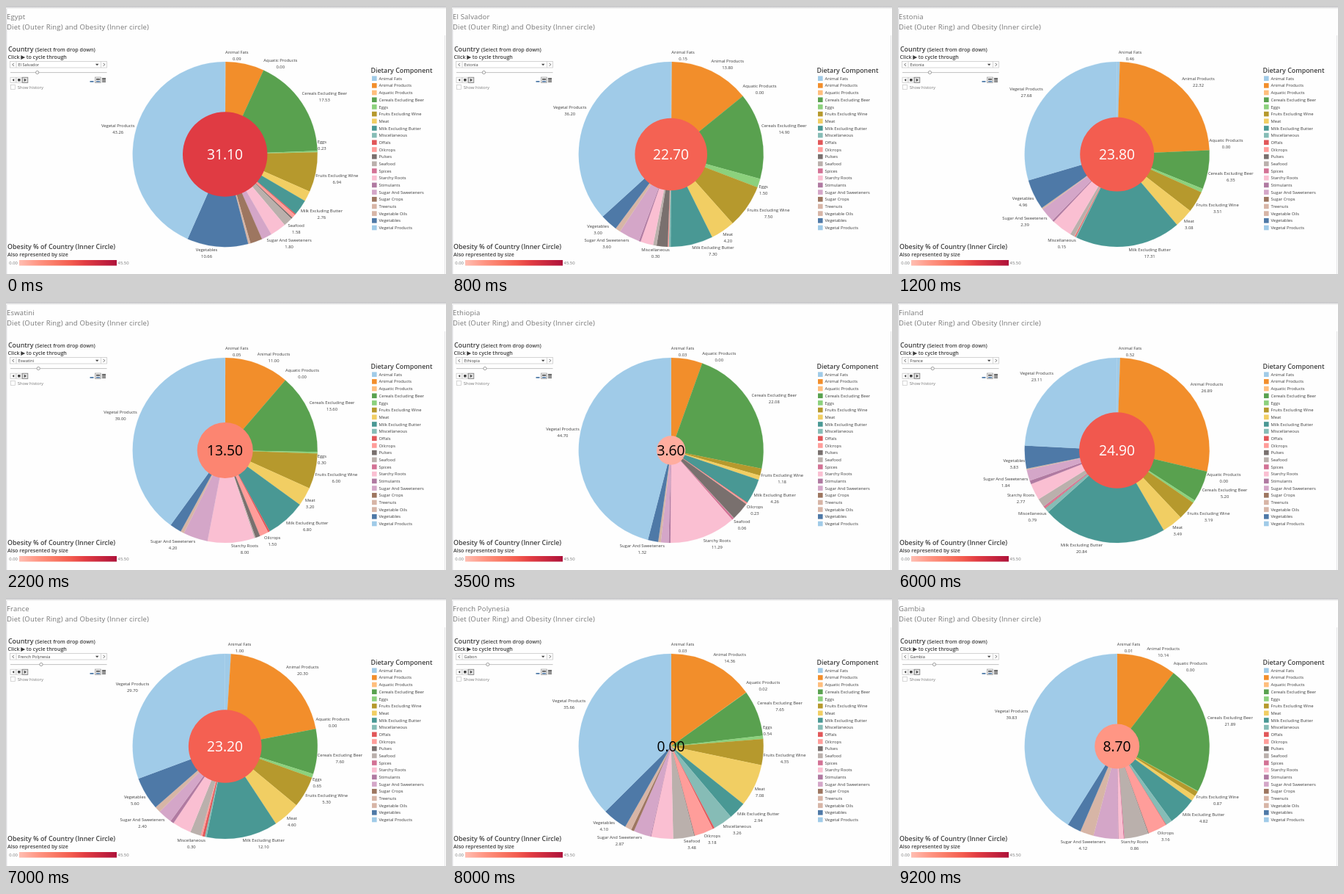
Recreate the animation shown at these times as an HTML page. Size 600 px wide and 365 px high, loop 9500 ms.

```html
<!DOCTYPE html>
<html lang="en">
<head>
<meta charset="utf-8">
<title>Diet and obesity by country</title>
<style>
  html, body { margin: 0; width: 100%; height: 100%; overflow: hidden; background: #fefefe; }
  svg { display: block; width: 600px; height: 365px; font: 5.85px "Open Sans", "Noto Sans", sans-serif; fill: #3c3c3c; }
  .title { font-size: 9.5px; letter-spacing: .18px; fill: #777; }
  .head { font-size: 8.9px; font-weight: 600; }
  .small { font-size: 7.1px; font-weight: 600; }
  .soft { fill: #777; }
  .mid { text-anchor: middle; }
  .big { font-size: 19.3px; text-anchor: middle; }
  .box { fill: #fff; stroke: #c4c4c4; stroke-width: .7; }
  .ink { fill: #444; }
  .line { fill: none; stroke: #555; stroke-width: .9; }
</style>
</head>
<body>
<svg id="stage" viewBox="0 0 600 365" xmlns="http://www.w3.org/2000/svg">
  <defs>
    <linearGradient id="ramp"></linearGradient>
    <linearGradient id="top" x2="0" y2="1">
      <stop stop-color="#bdbdc0"/><stop offset="1" stop-color="#fefefe"/>
    </linearGradient>
    <linearGradient id="side">
      <stop stop-color="#d2d2d5"/><stop offset="1" stop-color="#fefefe"/>
    </linearGradient>
  </defs>
  <rect width="600" height="365" fill="#fefefe"/>
  <rect width="2" height="365" fill="url(#side)"/>
  <rect width="600" height="4" fill="url(#top)"/>
  <path d="M598.5 40V365" stroke="#e4e4e6"/>

  <text id="title" class="title" x="1" y="18.4"></text>
  <text class="title" x="1" y="32.4">Diet (Outer Ring) and Obesity (Inner circle)</text>

  <text class="head" x="3" y="62">Country <tspan class="small">(Select from drop down)</tspan></text>
  <text class="small" x="2.5" y="71.8">Click ▶ to cycle through</text>

  <rect class="box" x="5.5" y="75.5" width="132" height="8.5"/>
  <path class="box" d="M14 75.5v8.5M129.5 75.5v8.5"/>
  <path class="line" d="M10.8 77.8l-2 2 2 2M132.7 77.8l2 2-2 2"/>
  <path class="ink" d="M122 78.8h4.4l-2.2 2.4z"/>
  <text id="pick" x="16.5" y="81.9" font-size="5.6"></text>

  <path d="M6 90.6H137.5" stroke="#c2c2c2"/>
  <circle id="thumb" cy="90.5" r="2.1" fill="#fff" stroke="#888" stroke-width=".8"/>

  <rect class="box" x="6" y="97.2" width="7.6" height="7.2"/>
  <rect class="box" x="14" y="97.2" width="7.6" height="7.2"/>
  <rect x="22.2" y="97.2" width="7.6" height="7.2" fill="#e2e2e2" stroke="#777" stroke-width=".8"/>
  <path class="ink" d="M11.2 98.9v3.8l-2.7-1.9zM16.1 99.1h3.5v3.5h-3.5zM24.8 98.7v4.2l3-2.1z"/>
  <rect x="121.6" y="97" width="8" height="7.6" fill="#e6e6e6" stroke="#999" stroke-width=".7"/>
  <path fill="#4e79a7" d="M114.5 102h5v1.7h-5zM123 101.9h5.2v1.7H123z"/>
  <path class="ink" d="M123 99h5.2v1.5H123zM131 98h5v1.4h-5zM131 100.2h5v1.4h-5zM131 102.4h5v1.4h-5z"/>
  <rect class="box" x="6.3" y="107.3" width="6" height="6"/>
  <text class="soft" x="15.8" y="112.7">Show history</text>

  <text class="head" x="497.5" y="90.7">Dietary Component</text>
  <g id="legend"></g>

  <text class="head" x="2" y="330.8">Obesity % of Country (Inner Circle)</text>
  <text class="small" x="2" y="341">Also represented by size</text>
  <text class="soft" x="4.3" y="352.3">0.00</text>
  <rect x="18" y="346" width="133" height="7.6" fill="url(#ramp)"/>
  <text class="soft" x="152.6" y="352.3">45.50</text>
  <g id="pies"></g>
</svg>
<script>
const LOOP = 9500, CX = 298.7, CY = 202, R = 126, MAX = 45.5;

const parts = [
  ["Animal Fats", "#a0cbe8"], ["Animal Products", "#f28e2b"], ["Aquatic Products", "#ffbe7d"],
  ["Cereals Excluding Beer", "#59a14f"], ["Eggs", "#8cd17d"], ["Fruits Excluding Wine", "#b6992d"],
  ["Meat", "#f1ce63"], ["Milk Excluding Butter", "#499894"], ["Miscellaneous", "#86bcb6"],
  ["Offals", "#e15759"], ["Oilcrops", "#ff9d9a"], ["Pulses", "#79706e"], ["Seafood", "#bab0ac"],
  ["Spices", "#d37295"], ["Starchy Roots", "#fabfd2"], ["Stimulants", "#b07aa1"],
  ["Sugar And Sweeteners", "#d4a6c8"], ["Sugar Crops", "#9d7660"], ["Treenuts", "#d7b5a6"],
  ["Vegetable Oils", "#d7b5a6"], ["Vegetables", "#4e79a7"], ["Vegetal Products", "#a0cbe8"]
];

// Picked at, shown at, name, obesity, diet. Letters a-v index the parts; capitals carry a label.
const countries = [
  [-1, 0, "Egypt", 31.1, "A.09 b6.74 C D17.53 E.23 F6.94 g1.8 H2.76 j.2 k.65 l.25 M1.58 o2.8 Q1.8 r2.1 t.4 U10.66 V43.26"],
  [0, 200, "El Salvador", 22.7, "A.15 B13.8 C D14.9 E1.5 F7.5 G4.2 H7.3 I.3 k.2 l1.9 m.6 o2.2 p.3 Q3.6 t.9 U3 V36.2"],
  [800, 1000, "Estonia", 23.8, "A.46 B22.32 C D6.35 e.6 F3.51 G3.08 H17.31 I.15 j.15 k.1 m.72 o3.35 p.3 Q2.39 t.25 U4.96 V27.68"],
  [2000, 2100, "Eswatini", 13.5, "A.05 B11 C D13.6 E.3 F6 G3.2 H6.8 j.3 K1.5 l.8 m.2 O8 Q4.2 t.6 u2 V39"],
  [3000, 3200, "Ethiopia", 3.6, "A.03 b5.3 C D22.08 F1.18 g.75 H4.26 j.1 K.23 l3.1 M.06 n.35 O11.29 p.3 Q1.32 t.45 u1.75 V44.7"],
  [4100, 4200, "Fiji", 30, "A.29 b7.85 C D10.14 e.25 F2.16 G3 H1.74 i.3 j.15 K4.38 l.75 M2.38 O7.86 Q9.73 T.87 u3.9 V42.15"],
  [5000, 5200, "Finland", 24.9, "A.52 B26.89 C D5.2 e.45 F3.19 G3.49 H20.84 I.79 j.1 n.3 m1.45 O2.77 p.6 Q1.84 t.2 U3.83 V23.11"],
  [6000, 6200, "France", 23.2, "A1 B20.3 C D7.6 E.65 F5.3 G4.6 H12.1 I.3 j.4 k.3 m1.8 o3.2 p.6 Q2.4 t1 U5.6 V29.7"],
  [7000, 7100, "French Polynesia", 0, "A.03 B14.36 C.02 D7.65 E.54 F4.35 G7.08 H2.94 I3.26 j.3 K3.18 l.1 M3.48 o3.65 p.1 Q2.87 r.5 t1.1 U4.1 V35.66"],
  [8000, 8100, "Gabon", 13.4, "A.1 B9.2 c D10.6 E.2 F10.5 G4.8 H1.7 j.3 k.6 M2.1 O13 p.1 Q1.9 t.8 u2.7 V40.8"],
  [9000, 9100, "Gambia", 8.7, "A.01 B10.14 C D21.89 e.1 F.87 g.9 H4.82 i1.1 j.1 K3.16 l.1 m4.05 n.15 O.86 p.1 Q4.12 t2.3 u2.35 V39.83"]
].map(([pick, show, name, obesity, diet]) => ({ pick, show, name, obesity, diet }));

const ramp = [
  [0, [255, 190, 178]], [.19, [255, 150, 132]], [.35, [250, 124, 104]],
  [.53, [243, 92, 79]], [.67, [226, 61, 67]], [1, [174, 18, 58]]
];

const $ = id => document.getElementById(id);

function add(parent, tag, attrs, text) {
  const el = document.createElementNS("http://www.w3.org/2000/svg", tag);
  for (const key in attrs) el.setAttribute(key, attrs[key]);
  if (text !== undefined) el.textContent = text;
  return parent.appendChild(el);
}

function shade(u) {
  const i = Math.max(1, ramp.findIndex(([at]) => at >= u));
  const [u0, a] = ramp[i - 1], [u1, b] = ramp[i];
  const k = (u - u0) / (u1 - u0);
  return `rgb(${a.map((c, j) => Math.round(c + (b[j] - c) * k))})`;
}

// Point on the rim; the turn runs clockwise from the top.
function rim(turn) {
  const a = turn * 2 * Math.PI;
  return [CX + R * Math.sin(a), CY - R * Math.cos(a)];
}

// The label box touches the rim with its nearest corner.
function addLabel(group, name, value, turn) {
  const [px, py] = rim(turn);
  const cy = py + (py < CY ? -8.9 : 8.9);
  const text = add(group, "text", { class: "mid", y: cy - 2.4 }, name);
  const cx = px + (px < CX ? -.5 : .5) * text.getComputedTextLength();
  text.setAttribute("x", cx);
  add(group, "text", { class: "mid", x: cx, y: cy + 6.6 }, value.toFixed(2));
}

function buildPie({ obesity, diet }) {
  const group = add($("pies"), "g", {});
  const slices = diet.split(" ").map(s => ({
    part: parts[s.toLowerCase().charCodeAt(0) - 97],
    labelled: s[0] < "a",
    value: +s.slice(1)
  }));
  const total = slices.reduce((sum, s) => sum + s.value, 0);
  let turn = 0;
  for (const { part: [name, fill], labelled, value } of slices) {
    const span = value / total;
    if (span) {
      const d = `M${CX} ${CY}L${rim(turn)}A${R} ${R} 0 ${+(span > .5)} 1 ${rim(turn + span)}Z`;
      add(group, "path", { d, fill, stroke: fill, "stroke-width": .2 });
    }
    if (labelled) addLabel(group, name, value, turn + span / 2);
    turn += span;
  }
  add(group, "circle", { cx: CX, cy: CY, r: 10.35 * Math.sqrt(obesity), fill: shade(obesity / MAX) });
  add(group, "text", { class: "big", x: CX - .2, y: 209, fill: obesity > 15 ? "#fff" : "#000" }, obesity.toFixed(2));
  return group;
}

parts.forEach(([name, fill], i) => {
  const y = 98.7 + 9.68 * i;
  add($("legend"), "rect", { x: 499, y: y - 3.3, width: 6.6, height: 6.6, fill });
  add($("legend"), "text", { x: 508.5, y: y + 2.1 }, name);
});
ramp.forEach(([offset]) => add($("ramp"), "stop", { offset, "stop-color": shade(offset) }));
const pies = countries.map(buildPie);

function latest(key, t) {
  let found = 0;
  countries.forEach((c, i) => { if (c[key] <= t) found = i; });
  return found;
}

let state = "";
function draw(now) {
  const t = now % LOOP;
  const shown = latest("show", t), picked = latest("pick", t);
  const next = shown + "/" + picked;
  if (next !== state) {
    state = next;
    pies.forEach((pie, i) => pie.setAttribute("visibility", i === shown ? "visible" : "hidden"));
    $("title").textContent = countries[shown].name;
    $("pick").textContent = countries[picked].name;
    $("thumb").setAttribute("cx", 41.9 + .76 * picked);
  }
}

const start = performance.now();
function tick() {
  draw(performance.now() - start);
  requestAnimationFrame(tick);
}
tick();
</script>
</body>
</html>
```
